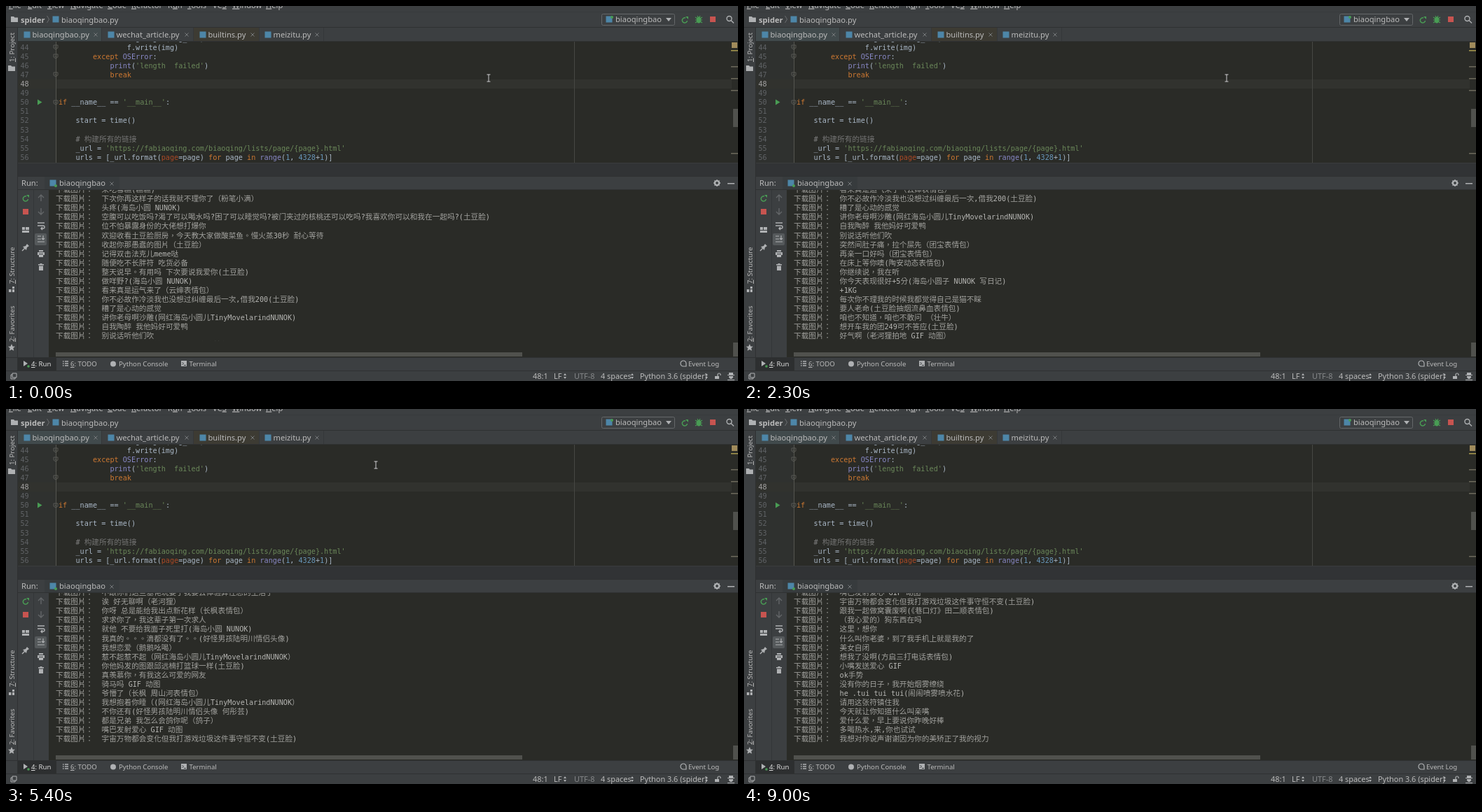
An HTML page for the animation above (9500 ms loop, 1045x536 px).

```html
<!DOCTYPE html>
<html lang="zh-Hant">
<head>
<meta charset="utf-8">
<style>
html, body { margin: 0; width: 100%; height: 100%; overflow: hidden; background: #3c3f41; }
svg { display: block; width: 1045px; height: 536px; }
text { white-space: pre; font: 11.15px "Noto Sans", "Open Sans", sans-serif; fill: #bbb; }
.small { font-size: 9.6px; }
.mono { font: 10.17px "DejaVu Sans Mono", monospace; fill: #a9b7c6; }
.out { fill: #b6b6b3; }
.cjk { font: 300 10.67px "Noto Sans CJK TC", "Noto Sans CJK SC", sans-serif; fill-opacity: .85; }
.num { fill: #606366; }
.k { fill: #cc7832; } .s { fill: #6a8759; } .b { fill: #8888c6; }
.n { fill: #6897bb; } .a { fill: #aa4926; } .c { fill: #808080; }
.u { text-decoration: underline; }
</style>
</head>
<body>
<svg id="stage" viewBox="0 0 1045 536">
  <defs>
    <clipPath id="codeClip"><rect x="17" y="51" width="1028" height="173"/></clipPath>
    <clipPath id="logClip"><rect x="61" y="263" width="976" height="216"/></clipPath>
  </defs>
</svg>
<script>
const ROW = 13.06, LOOP = 9500;
const BG = '#2a2b27', UI = '#3c3f41', EDGE = '#2f3132', GREY = '#afb1b3', GREEN = '#499c54', RED = '#c75450', BLUE = '#4d86a8';

const log = `来吃雪糕(糕糕)
下次你再这样子的话我就不理你了（粉笔小满）
头疼(海岛小圆 NUNOK)
空腹可以吃饭吗?渴了可以喝水吗?困了可以睡觉吗?被门夹过的核桃还可以吃吗?我喜欢你可以和我在一起吗?(土豆脸)
位不怕暴露身份的大佬想打爆你
欢迎收看土豆脸厨房，今天教大家做酸菜鱼。慢火蒸30秒 耐心等待
收起你那愚蠢的图片（土豆脸）
记得双击法克儿meme哒
随便吃不长胖符 吃货必备
整天说早。有用吗 下次要说我爱你(土豆脸)
做咩野?(海岛小圆 NUNOK)
看来真是运气来了（云婶表情包）
你不必故作冷淡我也没想过纠缠最后一次,借我200(土豆脸)
糟了是心动的感觉
讲你老母啊沙雕(网红海岛小圆儿TinyMovelarindNUNOK)
自我陶醉 我他妈好可爱鸭
别说话听他们吹
突然间肚子痛，拉个屎先（团宝表情包）
再亲一口好吗（团宝表情包）
在床上等你噢(陶安动态表情包)
你继续说，我在听
你今天表现很好+5分(海岛小圆子 NUNOK 写日记)
+1KG
每次你不理我的时候我都觉得自己是猫不睬
要人老命(土豆脸抽烟流鼻血表情包)
咱也不知道，咱也不敢问 （壮牛）
想开车我的团249可不答应(土豆脸)
好气啊（老河狸拍地 GIF 动图）
这他妈的是什么人间疾苦(老河狸)
你别惹我
不跟你们这些基佬玩耍了我要去体验异性恋的生活了
诶 好无聊啊（老河狸）
你呀 总是能给我出点新花样（长枫表情包）
求求你了，我这辈子第一次求人
就他 不要给我面子死里打(海岛小圆 NUNOK)
我真的。。。滴都没有了。。(好怪男孩陆明川情侣头像)
我想恋爱（鹅鹅吆喝）
惹不起惹不起（网红海岛小圆儿TinyMovelarindNUNOK）
你他妈发的图跟邱远楠打篮球一样(土豆脸)
真羡慕你，有我这么可爱的网友
骑马吗 GIF 动图
爷懵了（长枫 周山河表情包）
我想抱着你睡（(网红海岛小圆儿TinyMovelarindNUNOK）
不你还有(好怪男孩陆明川情侣头像 何彤芸)
都是兄弟 我怎么会鸽你呢（鸽子）
嘴巴发射爱心 GIF 动图
宇宙万物都会变化但我打游戏垃圾这件事守恒不变(土豆脸)
跟我一起做窝囊废啊(《巷口灯》田二顺表情包)
（我心爱的）狗东西在吗
这里，想你
什么叫你老婆，到了我手机上就是我的了
美女自闭
想我了没啊(方启三打电话表情包)
小嘴发送爱心 GIF
ok手势
没有你的日子，我开始烟雾缭绕
he .tui tui tui(闹闹喷雾喷水花)
请用这张符镇住我
今天就让你知道什么叫亲嘴
爱什么爱，早上要说你昨晚好棒
多喝热水,来,你也试试
我想对你说声谢谢因为你的美矫正了我的视力`.split('\n');

// [time, index of the newest line]
const scroll = [[0, 16], [400, 17], [600, 19], [1200, 20], [1500, 23], [1700, 25], [2100, 26], [2300, 27],
  [2800, 30], [3100, 32], [3400, 35], [3800, 37], [4000, 38], [4300, 39], [4800, 41], [5100, 43], [5200, 44],
  [5400, 46], [5600, 47], [5900, 48], [6200, 50], [6500, 51], [6800, 53], [7100, 54], [8200, 56], [8300, 57],
  [8500, 59], [9000, 61]];
// [time, x, y]
const pointer = [[0, 689, 103], [5100, 694, 90], [5200, 698, 76], [5400, 528, 80], [5600, 480, 76],
  [5700, 440, 72], [5800, 418, 71], [5900, 405, 71]];

// Code markup: {class|text}
const code = {
  43: '                img = get(img_url).content',
  44: '                f.write(img)',
  45: '        {k|except} {b|OSError}:',
  46: "            {b|print}({s|'length  failed'})",
  47: '            {k|break}',
  50: "{k|if} __name__ == {s|'__main__'}:",
  52: '    start = time()',
  54: '    {c|# 构建所有的链接}',
  55: "    _url = {s|'https://fabiaoqing.com/biaoqing/lists/page/{page}.html'}",
  56: '    urls = [_url.format({a|page}=page) {k|for} page {k|in} {b|range}({n|1}, {n|4328}+{n|1})]'
};

const wide = s => s.replace(/[\u2e80-\uffff]+/g, m => `<tspan class="cjk">${m}</tspan>`);
const mark = s => s.replace(/\{(\w)\|((?:\{\w+\}|[^{}])*)\}/g, '<tspan class="$1">$2</tspan>');
const text = (x, y, s, cls = '', extra = '') => `<text x="${x}" y="${y}" class="${cls}" ${extra}>${mark(s)}</text>`;
const rect = (x, y, w, h, fill, extra = '') => `<rect x="${x}" y="${y}" width="${w}" height="${h}" fill="${fill}" ${extra}/>`;
const path = (x, y, d, color = GREY, w = 1.4) =>
  `<path transform="translate(${x} ${y})" d="${d}" fill="none" stroke="${color}" stroke-width="${w}"/>`;
const solid = (x, y, d, color = GREY) => `<path transform="translate(${x} ${y})" d="${d}" fill="${color}"/>`;
const dot = (x, y, r, color) => `<circle cx="${x}" cy="${y}" r="${r}" fill="${color}"/>`;
const square = (x, y) => rect(x - 4.5, y - 4.5, 9, 9, BLUE);
const cross = (x, y) => path(x, y, 'M-2.5-2.5l5 5m0-5l-5 5', '#777a7c', 1);
const rerun = (x, y) => path(x, y, 'M3.5 1A3.6 3.6 0 1 1 1-3', GREEN, 1.5) + solid(x, y, 'M1-5h4v4z', GREEN);
const folder = (x, y) => solid(x, y, 'M-5-4h4l1.5 1.5H5V4H-5z');
const side = (y, s) => text(0, 0, s, 'small', `transform="translate(12 ${y}) rotate(-90)"`);
const updown = (x, y) => solid(x, y, 'M-2-1l2-3 2 3zM-2 1l2 3 2-3z');

function topBars() {
  const menu = [[4, '{u|F}ile'], [31, '{u|E}dit'], [59, '{u|V}iew'], [92, '{u|N}avigate'], [145, '{u|C}ode'],
    [179, '{u|R}efactor'], [231, 'R{u|u}n'], [259, '{u|T}ools'], [295, 'VC{u|S}'], [323, '{u|W}indow'], [371, '{u|H}elp']];
  const tabs = [[30, 'biaoqingbao.py', 128], [150, 'wechat_article.py', 258], [281, 'builtins.py', 352], [374, 'meizitu.py', 444]];
  return menu.map(m => text(m[0], 2.5, m[1])).join('') +
    rect(0, 8, 1045, 1, '#383b3d') + folder(12, 19) +
    text(21, 24, 'spider', '', 'style="font-weight:700"') +
    path(60, 19, 'M-1.5-5l3 5-3 5', '#6b6e70', 1) + square(71, 19) + text(79, 24, 'biaoqingbao.py') +
    rect(850.5, 11.5, 104, 16, UI, 'rx="2" stroke="#646769"') + square(861, 19) + dot(865, 16, 2, GREEN) +
    text(870, 23, 'biaoqingbao') + solid(946, 19, 'M-4-2h8l-4 5z') + rerun(969, 20) +
    `<ellipse cx="989" cy="20" rx="3.2" ry="4.5" fill="${GREEN}"/>` +
    path(989, 20, 'M-5-4l3 2m4 0l3-2M-5 0H5M-5 4l3-2m4 0l3 2M-2-6l1 2m2 0l1-2', GREEN, 1.1) +
    rect(1005, 15, 8, 8, RED) + path(1033, 18, 'M3 0A3.5 3.5 0 1 1-4 0A3.5 3.5 0 1 1 3 0M2 2.5l4 4') +
    rect(0, 30, 1045, 1, EDGE) + rect(17, 31, 119, 20, '#414a4c') + rect(267, 31, 94, 20, '#3d3b33') +
    [136, 267, 361, 453].map(x => rect(x, 31, 1, 20, '#343739')).join('') +
    tabs.map(([x, s, end]) => square(x, 41) + text(x + 7.5, 45, s) + cross(end, 41)).join('') +
    rect(17, 50, 1028, 1, EDGE);
}

function editor() {
  let out = rect(17, 51, 1028, 173, BG) + rect(17, 51, 54, 173, '#2f312f') + rect(17, 105, 1019, 13, '#31322e') +
    rect(811, 51, 1, 173, '#474843') + rect(71, 51, 1, 173, '#555650') + '<g clip-path="url(#codeClip)">';
  for (let n = 43; n < 57; n++) {
    const y = 63 + (n - 44) * ROW;
    out += text(20.5, y, String(n), 'mono num', n == 48 ? 'style="fill:#a4a3a3"' : '');
    if (code[n]) out += `<text x="75" y="${y}" class="mono">${wide(mark(code[n]))}</text>`;
  }
  out += '</g>' + solid(48, 137.5, 'M-3-4l6.5 4-6.5 4z', GREEN);
  for (const y of [59, 72, 98, 138])
    out += path(71, y, 'M-3-3h6v4l-3 2-3-2zM-1.5 0h3', '#62635d', 0.8);
  out += rect(1036, 52, 8, 8, '#a08b5b');
  [64, 87, 104, 121, 211].forEach((y, i) => out += rect(1035, y - 1, 10, 1.5, i ? '#6d6a5c' : '#a89a4e'));
  return out + rect(1038, 147, 7, 26, '#50514d') + rect(17, 224, 1028, 20, '#313335') + rect(17, 224, 1028, 1, '#3a3c3d');
}

function runPanel() {
  const dim = '#636668';
  return rect(17, 243, 1028, 20, UI) + rect(17, 243, 1028, 1, EDGE) + rect(55, 244, 107, 18, '#373b3d') +
    text(22, 257, 'Run:') + square(67, 253) + dot(71, 257, 2, GREEN) +
    text(76, 257, 'biaoqingbao') + cross(151, 254) +
    path(1015, 253, 'M3 0A3 3 0 1 1-3 0A3 3 0 1 1 3 0', GREY, 2.2) +
    path(1015, 253, 'M0-5v2m0 6v2M-5 0h2m6 0h2M-3.5-3.5l1.4 1.4m4.2 4.2l1.4 1.4m0-7l-1.4 1.4m-4.2 4.2l-1.4 1.4') +
    rect(1030, 253, 10, 1.5, GREY) + rect(17, 262, 1028, 1, EDGE) +
    rect(61, 263, 984, 239, BG) + rect(39, 263, 1, 239, '#333638') +
    rerun(28, 275) + rect(24, 290, 8, 8, RED) + solid(28, 320, 'M-5-4h4v4h-4zM0-4h5v4H0zM-5 1H5v3H-5z') +
    path(28, 345, 'M-5 5l4-4') + solid(28, 345, 'M-4-1l4-1 2-3 3 3-3 2-1 4z') +
    path(50, 274, 'M0 5v-9m-4 4l4-4 4 4', dim) + path(50, 294, 'M0-5v9m-4-4l4 4 4-4', dim) +
    path(50, 314, 'M-5-4H5M-5 0H3a2 2 0 0 1 0 4H0m2-2l-2 2 2 2') +
    rect(41, 325, 17, 17, '#55595b', 'rx="2"') + path(50, 333, 'M-5-4h5M-5 0h5M-5 4H5M3-5v6m-2-2l2 2 2-2', GREY, 1.2) +
    solid(50, 354, 'M-3-5h6v2h-6zM-5-2H5v4H3V0h-6v2h-2zM-3 1h6v4h-6z') +
    solid(50, 373, 'M-4-4h2l1-1h2l1 1h2v1.5h-8zM-3-1.5h6V5h-6z') +
    rect(71, 495, 666, 6, '#50514d') + rect(1038, 481, 7, 20, '#50514d');
}

function frameBars() {
  const status = [[752, '48:1'], [782, 'LF'], [811, 'UTF-8', 'num'], [849, '4 spaces'], [905, 'Python 3.6 (spider)']];
  return rect(16, 31, 1, 490, EDGE) + side(80, '{u|1}: Project') + folder(8, 89) +
    side(397, '{u|7}: Structure') + solid(8, 405, 'M-4 0h3.5v4H-4zM1 0h3v4H1zM1-4h3v3H1z') +
    side(480, '{u|2}: Favorites') + solid(8, 488, 'M0-5l1.5 3.5 3.5.3-2.7 2.3.9 3.7L0 3l-3.2 1.8.9-3.7L-5-1.2l3.5-.3z') +
    rect(0, 502, 1045, 1, EDGE) + rect(17, 503, 55, 18, '#2d2f30') + solid(28, 511, 'M-3-4l6 4-6 4z') +
    dot(32, 515, 1.8, GREEN) + text(36, 515, '{u|4}: Run', 'small', 'style="fill:#ddd"') +
    path(85, 511, 'M-4-3h1.5m1.5 0h5M-4 0h1.5m1.5 0h5M-4 3h1.5m1.5 0h5') + text(92, 515, '{u|6}: TODO', 'small') +
    dot(153, 511.5, 4, GREY) + text(161, 515, 'Python Console', 'small') +
    rect(250, 507, 8, 8, GREY) + path(254, 511, 'M-2.5-2l2 2-2 2M0 2.5h3', UI, 1) + text(261.5, 515, 'Terminal', 'small') +
    path(967, 511, 'M4 4H0A4 4 0 1 1 4 0z', GREY, 1.2) + text(974, 515, 'Event Log', 'small') +
    rect(0, 521, 1045, 1, EDGE) + path(11, 529, 'M-2-4h6v6h-6zM-2-2h-2v6h6V2', GREY, 1) +
    status.map(([x, s, cls]) => text(x, 533, s, cls, `style="font-size:10.9px${cls ? ';fill:#858789' : ''}"`)).join('') +
    [798, 894, 1000].map(x => updown(x, 529)).join('') +
    rect(1012, 529, 6, 4, GREY) + path(1016, 528, 'M0 1v-2a2 2 0 0 1 4 0v1', GREY, 1.2) +
    solid(1035, 529, 'M-3-5h6v3h2v1H-5v-1h2zM-3 0h6v2L1 4h-2l-2-2zM-5 5h10v1H-5z');
}

const logGroup = '<g clip-path="url(#logClip)"><g id="log">' + log.map((s, i) =>
  `<text x="71" y="${279.3 + (i - 1) * ROW}" class="mono out">${wide('下载图片：  ' + s)}</text>`).join('') + '</g></g>';
const beam = 'M-2.5-5h5M0-5v10M-2.5 5h5';
const stage = document.getElementById('stage');
stage.innerHTML += topBars() + editor() + runPanel() + frameBars() + logGroup +
  `<g id="pointer">${path(0, 0, beam, '#1b1b1b', 2)}${path(0, 0, beam, '#dcdcdc', 1)}</g>`;
const logEl = document.getElementById('log'), pointerEl = document.getElementById('pointer');

const at = (keys, t) => keys.findLast(k => k[0] <= t);

function pointerAt(t) {
  if (t < 6100) return at(pointer, t).slice(1);
  const p = Math.min(1, (Math.floor(t / 100) - 60) / 9);
  return [405 - 85 * p, 71 - 83 * p];
}

function draw(now) {
  const t = now % LOOP, [x, y] = pointerAt(t);
  logEl.setAttribute('transform', `translate(0 ${(16 - at(scroll, t)[1]) * ROW})`);
  pointerEl.setAttribute('transform', `translate(${x} ${y})`);
}

const start = performance.now();
function tick() {
  draw(performance.now() - start);
  requestAnimationFrame(tick);
}
tick();
</script>
</body>
</html>
```
